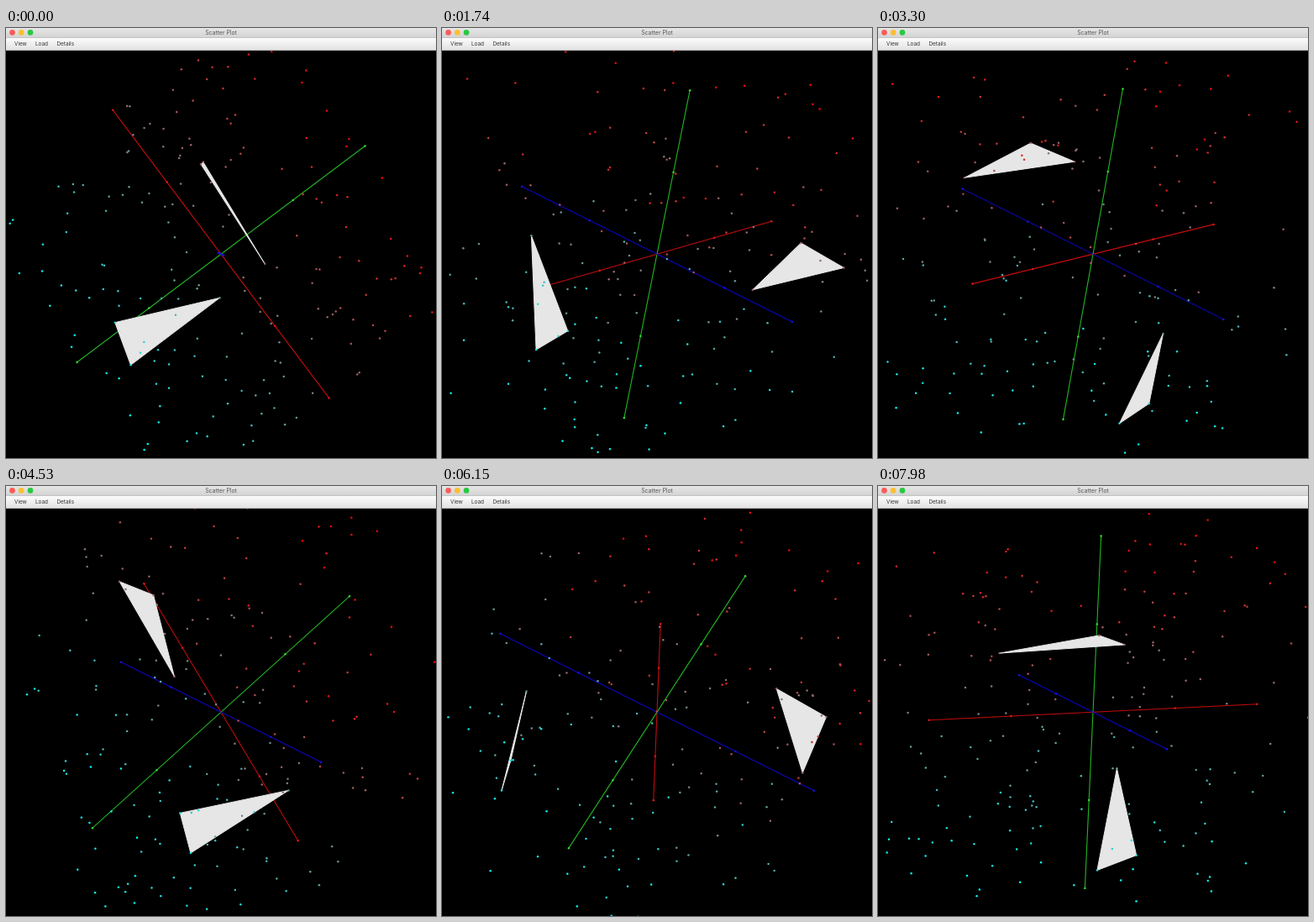
These frames come from a looping animation (512x512 px, 8 s). An HTML page with a canvas:

```html
<!DOCTYPE html>
<html lang="en">
<head>
<meta charset="utf-8">
<title>Scatter Plot</title>
<style>
  html, body { margin: 0; width: 100%; height: 100%; overflow: hidden; background: #000; }
  canvas, svg { position: absolute; left: 0; top: 0; display: block; }
  text { font-family: Inter, "Open Sans", sans-serif; }
</style>
</head>
<body>
<canvas id="plot" width="512" height="512"></canvas>
<svg width="512" height="27" viewBox="0 0 512 27">
  <defs>
    <linearGradient id="titleFill" x2="0" y2="1">
      <stop offset="0" stop-color="#e6e6e6"/><stop offset="1" stop-color="#d2d2d2"/>
    </linearGradient>
    <linearGradient id="menuFill" x2="0" y2="1">
      <stop offset="0" stop-color="#fcfcfc"/><stop offset="1" stop-color="#e2e2e2"/>
    </linearGradient>
  </defs>
  <rect width="512" height="12" fill="url(#titleFill)"/>
  <rect y="12" width="512" height="14" fill="url(#menuFill)"/>
  <rect y="11" width="512" height="1" fill="#c4c4c4"/>
  <rect y="26" width="512" height="1" fill="#b0b0b0"/>
  <circle cx="7.5" cy="5.4" r="3.3" fill="#fc5b57"/>
  <circle cx="18.2" cy="5.4" r="3.3" fill="#fdbe2f"/>
  <circle cx="29" cy="5.4" r="3.3" fill="#28c840"/>
  <text x="256" y="8" font-size="6.9" text-anchor="middle" fill="#555">Scatter Plot</text>
  <g font-size="6.4" fill="#333">
    <text x="10" y="21.3">View</text>
    <text x="35" y="21.3">Load</text>
    <text x="60.5" y="21.3">Details</text>
  </g>
</svg>
<script>
const ctx = document.getElementById('plot').getContext('2d');
const CENTER = { x: 256, y: 269.25 };
const LOOP = 8000, STEP = 30;
const START_ANGLE = -0.9, ANGLE_STEP = 2.136; // degrees
const ROOT5 = Math.sqrt(5);
const POINT_COUNT = 194;

// Space is [u, v, z]: u runs along the spin axis, v across it, z is depth.
const AXES = [
  { dir: [95.8, -191.8, 0], line: '#c40c0c', dot: '#e81414' },
  { dir: [191.8, 95.8, 0], line: '#22b422', dot: '#30e030' },
  { dir: [0, 0, 214.4], line: '#0e04c0', dot: '#1c10e4' }
];
const TRIANGLES = [
  [[-129.3, -78.3, -115.3], [-47.3, 19.4, -158.6], [-166.2, -38.9, -118]],
  [[85, -66.1, 202.9], [88.6, -65.9, 133], [13, 54.7, 179.6]]
];

function seeded(seed) {
  return () => {
    seed = (seed + 0x6d2b79f5) | 0;
    let n = Math.imul(seed ^ (seed >>> 15), 1 | seed);
    n = (n + Math.imul(n ^ (n >>> 7), 61 | n)) ^ n;
    return ((n ^ (n >>> 14)) >>> 0) / 4294967296;
  };
}

const random = seeded(17);
const spread = () => random() * 2 - 1;
const mix = weights => [0, 1, 2].map(i =>
  AXES.reduce((sum, axis, k) => sum + axis.dir[i] * weights[k], 0));

// Cyan at the low end of the green axis, grey in the middle, red at the top.
function heightColor([u, v]) {
  const [gu, gv] = AXES[1].dir;
  const height = (u * gu + v * gv) / (gu * gu + gv * gv);
  const red = Math.round(127.5 * (1 + height));
  return `rgb(${red},${255 - red},${255 - red})`;
}

const points = TRIANGLES.flat();
for (let i = 0; i < POINT_COUNT; i++) {
  const height = 2 * (i + random()) / POINT_COUNT - 1;
  points.push(mix([spread(), height, spread()]));
}
const dots = points.map(pos => ({ pos, color: heightColor(pos) }));

function project([u, v, z], angle) {
  const across = v * Math.cos(angle) + z * Math.sin(angle);
  return [CENTER.x + (u + 2 * across) / ROOT5, CENTER.y + (across - 2 * u) / ROOT5];
}

function drawDot(pos, angle, color) {
  ctx.fillStyle = color;
  ctx.beginPath();
  ctx.arc(...project(pos, angle), 1.25, 0, Math.PI * 2);
  ctx.fill();
}

function drawAxis({ dir, line, dot }, angle) {
  const at = k => dir.map(c => c * k);
  ctx.strokeStyle = line;
  ctx.lineWidth = 1.1;
  ctx.beginPath();
  ctx.moveTo(...project(at(-1), angle));
  ctx.lineTo(...project(at(1), angle));
  ctx.stroke();
  [-1, -0.5, 0.5, 1].forEach(k => drawDot(at(k), angle, dot));
}

function drawTriangle(corners, angle) {
  ctx.fillStyle = ctx.strokeStyle = '#e6e6e6';
  ctx.lineWidth = 1;
  ctx.lineJoin = 'round';
  ctx.beginPath();
  corners.forEach(corner => ctx.lineTo(...project(corner, angle)));
  ctx.closePath();
  ctx.fill();
  ctx.stroke();
}

function draw(now) {
  const step = Math.floor((now % LOOP) / STEP);
  const angle = (START_ANGLE + ANGLE_STEP * step) * Math.PI / 180;
  ctx.fillStyle = '#000';
  ctx.fillRect(0, 0, 512, 512);
  AXES.forEach(axis => drawAxis(axis, angle));
  TRIANGLES.forEach(corners => drawTriangle(corners, angle));
  dots.forEach(({ pos, color }) => drawDot(pos, angle, color));
}

let begin;
function tick(now) {
  begin ??= now;
  draw(now - begin);
  requestAnimationFrame(tick);
}
draw(0);
requestAnimationFrame(tick);
</script>
</body>
</html>
```
